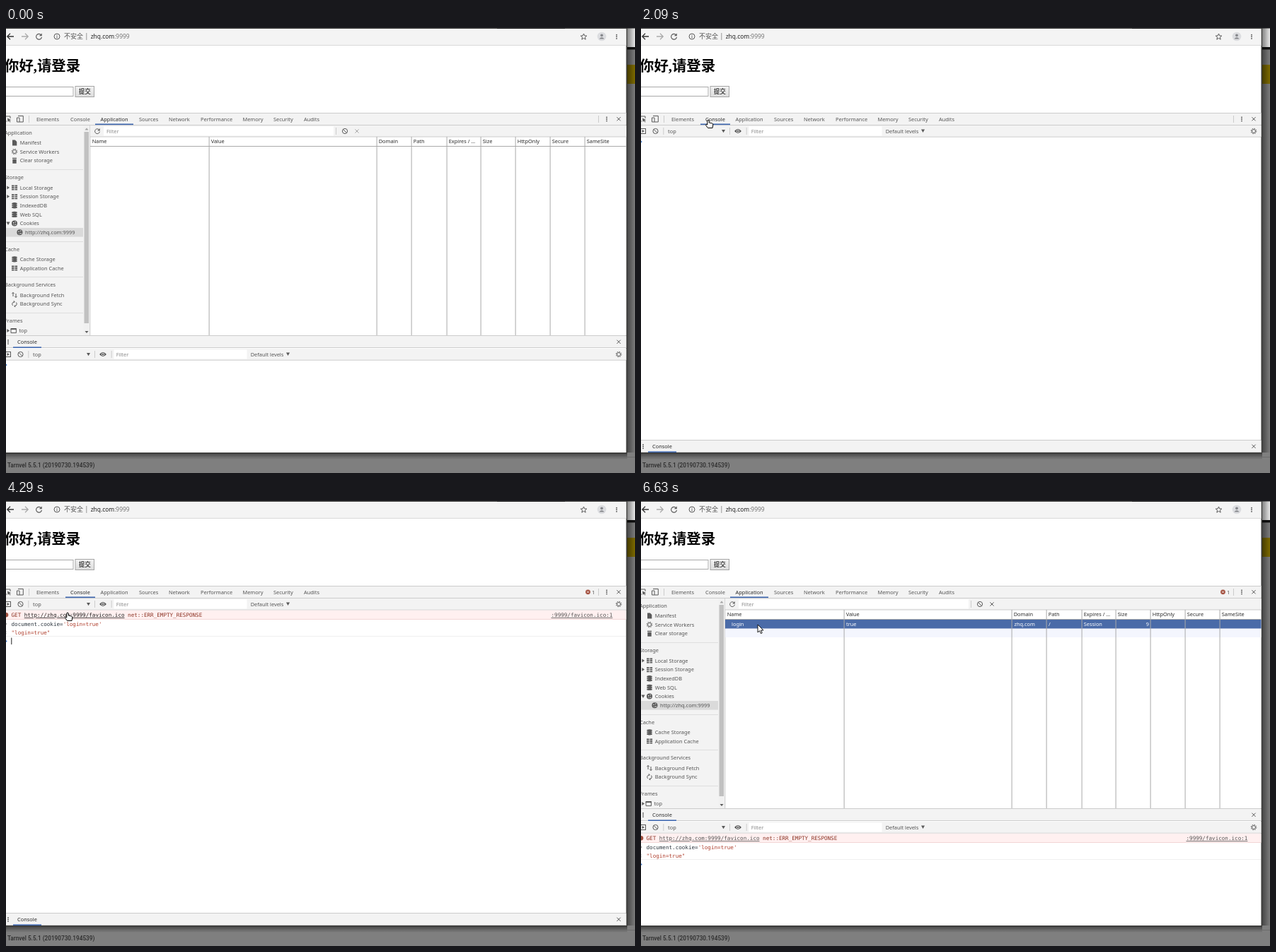
These frames come from a looping animation (889x630 px, 9.75 s). An HTML page:

```html
<!DOCTYPE html>
<html lang="zh-CN">
<head>
<meta charset="utf-8">
<title>Cookie login</title>
<style>
html, body { margin: 0; width: 100%; height: 100%; overflow: hidden; background: #7f7f7f; }
svg { display: block; width: 889px; height: 630px; }
text { font: 7.4px "Noto Sans", "Noto Sans CJK SC", sans-serif; fill: #555; white-space: pre; }
.dark { fill: #2b2b2b; }
.hint { fill: #8a8a8a; }
.mono { font: 7.6px "DejaVu Sans Mono", monospace; fill: #303942; }
.red { fill: #8c3324; }
.str { fill: #b0402f; }
.link { fill: #545454; text-decoration: underline; }
.url { font-size: 8.4px; fill: #222; }
.cjk { font-size: 9px; }
.title { font: bold 20.4px "Liberation Serif", "Noto Sans CJK SC", serif; fill: #000; }
.foot { font: 500 8.25px Roboto, sans-serif; fill: #2c2c2c; }
.ic { fill: #5a5a5a; }
.ln { fill: none; stroke: #5a5a5a; stroke-width: 1; }
.cur { fill: #fff; stroke: #000; stroke-width: 1; stroke-linejoin: round; }
</style>
</head>
<body>
<svg id="stage" viewBox="0 0 889 630"></svg>
<script>
const LOOP = 9750;
const stage = document.getElementById('stage');

const rect = (x, y, w, h, fill, more = '') =>
  `<rect x="${x}" y="${y}" width="${w}" height="${h}" fill="${fill}" ${more}/>`;
const hline = (y, fill = '#ccc', w = 876) => rect(0, y, w, 1, fill);
const vline = (x, y, h, fill = '#ccc') => rect(x, y, 1, h, fill);
const text = (x, y, s, cls = '', more = '') => `<text x="${x}" y="${y}" class="${cls}" ${more}>${s}</text>`;
const path = (d, cls = 'ic', more = '') => `<path d="${d}" class="${cls}" ${more}/>`;
const at = (x, y, body) => `<g transform="translate(${x} ${y})">${body}</g>`;
const group = (id, body) => `<g id="${id}">${body}</g>`;

const rows = f => [-3.4, -0.8, 1.8].map(f).join('');
const icon = {
  file: path('M-3-4H.8L3.3-1.5V4H-3Z'),
  gear: '<circle r="2.5" class="ln" stroke-width="1.7"/><circle r="3.8" class="ln" stroke-dasharray="1.5 1.48"/>',
  trash: path('M-3-4H3V-2.8H-3ZM-2.7-2H2.7V4H-2.7Z'),
  grid: path(rows(y => `M-4 ${y}h3.6v1.8h-3.6zM.5 ${y}h3.6v1.8h-3.6z`)),
  db: path(rows(y => `M-3.7 ${y}q3.7-1.6 7.4 0v1.6q-3.7 1.4-7.4 0z`)),
  cookie: '<circle r="4" class="ic"/>' + path('M-2-1.5h1.3v1.3h-1.3zM.7-2.5h1.2v1.2h-1.2zM.8.8h1.4v1.4h-1.4zM-1.4 1.5h1v1h-1z', '', 'fill="#f3f3f3"'),
  fetch: path('M-2 2V-3.4M-3.6-1.8L-2-3.6-.4-1.8M2-2V3.4M.4 1.8L2 3.6 3.6 1.8', 'ln'),
  sync: path('M-2.4 2.2A3.2 3.2 0 0 1-.4-3.1M2.4-2.2A3.2 3.2 0 0 1 .4 3.1M-1.2-4.4L.4-3.1-1.2-1.8M1.2 4.4L-.4 3.1 1.2 1.8', 'ln'),
  frame: path('M-3.7-3H3.7V3H-3.7Z', 'ln') + rect(-4, -3.4, 8, 1.8, '#5a5a5a'),
  ban: '<circle r="3.6" class="ln"/>' + path('M-2.5-2.5L2.5 2.5', 'ln'),
  close: path('M-2.6-2.6L2.6 2.6M2.6-2.6L-2.6 2.6', 'ln'),
  dots: rows(y => `<circle cy="${y + 0.8}" r=".95" class="ic"/>`),
  reload: path('M2.6-2A3.4 3.4 0 1 0 3.4.7', 'ln') + path('M3.7-4V-.6H.3Z'),
  eye: path('M-5 0Q0-6 5 0Q0 6-5 0Z') + '<circle r="2.1" fill="#f3f3f3"/><circle r="1.2" class="ic"/>',
  down: path('M-2.5-2H2.5L0 2.3Z'),
  right: path('M-1.6-2.5L2 0-1.6 2.5Z')
};
const put = (name, x, y) => at(x, y, icon[name]);

function backdrop() {
  return rect(0, 0, 889, 630, '#7f7f7f') +
    rect(878, 1, 11, 26, '#ececec') + rect(878, 27, 11, 3.5, '#111') +
    rect(878, 52, 11, 27, '#7f6c00') + rect(878, 0, 11, 601, 'url(#sideShade)') +
    rect(0, 602, 878, 9, 'url(#footShade)') + hline(607, '#6c6c6c', 889) +
    text(2, 622.3, 'Tarnvel 5.5.1 (20190730.194539)', 'foot') +
    rect(0, 0, 878, 602.5, '#3a3a38') + rect(0, 1, 876.5, 600, '#fff');
}

function browser() {
  return rect(694, 0, 96, 1, '#161616') + rect(0, 1, 876.5, 23.5, '#f4f4f4') + hline(24, '#dadada', 876.5) +
    at(6, 12, path('M5 0H-4M0-4.2L-4.2 0 0 4.2', 'ln', 'style="stroke:#333;stroke-width:1.3"')) +
    at(27, 12, path('M-5 0H4M0-4.2L4.2 0 0 4.2', 'ln', 'style="stroke:#aaa;stroke-width:1.3"')) +
    at(46.5, 12, `<g transform="scale(1.15)">${icon.reload}</g>`) +
    at(72, 12, '<circle r="4" class="ln"/>' + path('M-.5-2.2H.5V-1.2H-.5ZM-.5-.4H.5V2.3H-.5Z')) +
    text(82, 15.4, '不安全', 'cjk') + vline(113.3, 7, 10, '#999') +
    text(119.7, 15, 'zhq.com<tspan fill="#777">:9999</tspan>', 'url') +
    at(816.5, 12.3, path('M0-4.3L1.2-1.4 4.3-1.2 1.9.8 2.7 3.9 0 2.2-2.7 3.9-1.9.8-4.3-1.2-1.2-1.4Z', 'ln')) +
    at(842, 12, '<circle r="6.3" fill="#dcdde0"/><circle cy="-1.7" r="1.9" fill="#85878b"/>' + path('M-3.6 3.6Q0-1 3.6 3.6Z', '', 'fill="#85878b"')) +
    put('dots', 863, 12.3) +
    text(-2, 61.2, '你好,请登录', 'title') +
    rect(-5, 83.5, 100, 13, '#fff', 'stroke="#a9a9a9"') +
    rect(98, 82.5, 26.5, 15, 'url(#button)', 'stroke="#a6a6a6"') +
    text(102.7, 93.2, '提交', '', 'style="font-size:8.6px;fill:#000"');
}

const tabs = { Elements: 43, Console: 91, Application: 133.6, Sources: 188, Network: 230, Performance: 275, Memory: 334.5, Security: 378, Audits: 421 };

function tabBar() {
  return rect(0, 120, 876.5, 17, '#f3f3f3') + hline(120) + hline(137) +
    group('hover', rect(126, 121, 54, 16, '#e8e8e8')) +
    path('M-1 125H6V128M-1 132H1', 'ln') + path('M2 127.5L7.2 130.2 5 130.9 6.6 133 5.6 133.6 4.2 131.6 2.6 133Z') +
    path('M17 124.5H24.3V133H19', 'ln') + path('M15.5 127H19V133H15.5Z', 'ln') +
    vline(32, 124, 10) + vline(837, 124, 10) +
    Object.entries(tabs).map(([s, x]) => text(x, 131.7, s, '', `id="tab${s}"`)).join('') +
    rect(0, 135.5, 1, 1.6, '#3f68b0', 'id="mark"') +
    group('badge', at(822.5, 128.8, '<circle r="3.4" fill="#a3503f"/>' + path('M-1.4-1.4L1.4 1.4M1.4-1.4L-1.4 1.4', 'ln', 'style="stroke:#fff;stroke-width:.8"')) + text(828, 131.6, '1')) +
    put('dots', 849, 129) + put('close', 866, 128.8);
}

// [label, centre y, icon, indent, twisty]
const tree = [
  ['Application', 148], ['Manifest', 162.4, 'file'], ['Service Workers', 175, 'gear'], ['Clear storage', 187.7, 'trash'],
  ['Storage', 211.4], ['Local Storage', 226, 'grid', 0, 'right'], ['Session Storage', 238.6, 'grid', 0, 'right'],
  ['IndexedDB', 251.3, 'db'], ['Web SQL', 264, 'db'], ['Cookies', 276.6, 'cookie', 0, 'down'], ['http://zhq.com:9999', 289.2, 'cookie', 7.4],
  ['Cache', 313], ['Cache Storage', 327.4, 'db'], ['Application Cache', 340, 'grid'],
  ['Background Services', 363.5], ['Background Fetch', 378, 'fetch'], ['Background Sync', 390.7, 'sync'],
  ['Frames', 414], ['top', 428.6, 'frame', -1.3, 'right']
];
const columns = { Name: 119, Value: 287, Domain: 524, Path: 573, 'Expires / …': 623, Size: 671, HttpOnly: 720, Secure: 769, SameSite: 818 };

function sidebar() {
  return rect(0, 138, 119, 297, '#f3f3f3') + rect(0, 283, 109, 12.6, '#dadada') +
    [200, 302, 352, 403].map(y => hline(y, '#dedede', 109)).join('') +
    tree.map(([s, y, pic, dx = 0, twisty]) =>
      (pic ? put(pic, 12 + dx, y) : '') + (twisty ? put(twisty, 3, y) : '') +
      text(pic ? 19.7 + dx : -2, y + 2.7, s)).join('') +
    rect(109.5, 138, 9, 297, '#f1f1f1') + rect(110.5, 147, 6.5, 271, '#c1c1c1') +
    path('M111.5 144.5H116.5L114 141.5Z', '', 'fill="#a3a3a3"') + path('M111.5 429H116.5L114 432Z') +
    vline(118.3, 138, 297);
}

function cookieRow() {
  const cells = [['login', 128], ['true', 290], ['zhq.com', 527.5], ['/', 576], ['Session', 625.7], ['9', 713.7]];
  return rect(119, 180.5, 757.5, 12.5, '#f4f6fe') + rect(119, 168, 757.5, 12.5, 'none', 'id="pick"') +
    group('cells', cells.map(([s, x]) => text(x, 176.7, s, '', 'style="fill:inherit"')).join(''));
}

function appPane() {
  return rect(0, 138, 876.5, 297, '#fff') + sidebar() +
    rect(119, 138, 757.5, 16, '#f3f3f3') + rect(138, 139.5, 325, 13, '#fff') + put('reload', 129, 146) +
    text(142, 148.7, 'Filter', 'hint') + vline(466, 141, 10) + put('ban', 479, 146) +
    group('clear', put('close', 496, 146)) +
    rect(119, 153.5, 757.5, 1, '#ccc') + rect(119, 167, 757.5, 1, '#aaa') +
    group('row', cookieRow()) +
    Object.entries(columns).map(([s, x], i) => (i ? vline(x - 0.4, 154, 281, '#aaa') : '') + text(x + 2.7, 163.4, s, 'dark')).join('');
}

function drawerHead() {
  return rect(0, 436, 876.5, 17, '#f3f3f3') + hline(435) + hline(452) + put('dots', 3, 444.5) +
    text(16, 447.4, 'Console', 'dark') + rect(10, 451.4, 40, 1.6, '#3f68b0') + put('close', 866, 444.3);
}

const chevron = (y, color) => path(`M-1.5 ${y - 2}L.8 ${y} -1.5 ${y + 2}`, 'ln', `style="stroke:${color};stroke-width:1.2"`);

function consolePane() {
  return rect(0, 138, 876.5, 16, '#f3f3f3') + hline(153.7) +
    rect(-1, 142.5, 7.5, 7, 'none', 'class="ln"') + path('M1.5 144L5 146 1.5 148Z') +
    put('ban', 20.5, 146) + vline(31.3, 141, 10) + text(38, 148.7, 'top') + put('down', 116.5, 146) +
    vline(125, 141, 10) + put('eye', 137, 146) + vline(148.7, 141, 10) +
    rect(152.5, 139.5, 188, 13, '#fff') + text(155.7, 148.7, 'Filter', 'hint') +
    text(345.7, 148.7, 'Default levels') + put('down', 398.5, 145.6) + put('gear', 866, 146) +
    group('error', rect(0, 154.7, 876.5, 13, '#fff0f0') + hline(167, '#f3d6d6') +
      '<circle cx="0" cy="161.2" r="3.3" fill="#a3503f"/>' +
      text(7.5, 164, 'GET <tspan class="link" id="link">http://zhq.com:9999/favicon.ico</tspan> net::ERR_EMPTY_RESPONSE', 'mono red') +
      text(770.5, 164, ':9999/favicon.ico:1', 'mono link')) +
    group('command', text(7.5, 176.7, 'document.cookie=<tspan class="str">\'login=true\'</tspan>', 'mono')) +
    group('answer', chevron(174, '#aaa') + path('M1-1.8L-1.2 0 1 1.8', 'ln', 'transform="translate(0 186.4)" style="stroke:#bbb"') +
      text(7.5, 189, '"login=true"', 'mono str') + hline(191, '#f0f0f0', 876)) +
    group('prompt', chevron(0, '#3a78d0')) + rect(0, 0, 1, 9.5, '#222', 'id="caret"');
}

const tip = (id, x, w, s) => group(id,
  rect(x + 1, 156, w, 16, '#000', 'rx="2" opacity=".15"') +
  rect(x, 155.5, w, 15.5, '#f3f3f3', 'rx="2" stroke="#bdbdbd"') + text(x + 5, 165.8, s, 'dark'));

const cursors = {
  arrow: path('M0 0V11L2.6 8.7 4.4 12.6 6.2 11.8 4.5 8H8Z', 'cur', 'style="fill:#fff;stroke-width:.9"'),
  hand: path('M-1.2.8Q0-.8 1.2.8V4L5.6 5Q7 5.5 6.8 7L6 11.5H-.5L-3.6 7.3Q-3.6 5.6-1.2 7Z', 'cur'),
  ibeam: path('M-2.5-6Q0-6 0-4.8Q0-6 2.5-6M0-5V5M-2.5 6Q0 6 0 4.8Q0 6 2.5 6', 'ln', 'style="stroke:#111;stroke-width:1.3"'),
  resize: path('M0-7L4-2.7H1.3V2.7H4L0 7-4 2.7H-1.3V-2.7H-4Z', 'cur')
};

stage.innerHTML = `<defs>
  <linearGradient id="sideShade"><stop stop-opacity=".45"/><stop offset="1" stop-opacity=".02"/></linearGradient>
  <linearGradient id="footShade" x2="0" y2="1"><stop stop-opacity=".45"/><stop offset="1" stop-opacity="0"/></linearGradient>
  <linearGradient id="button" x2="0" y2="1"><stop stop-color="#f3f3f3"/><stop offset="1" stop-color="#dcdcdc"/></linearGradient>
  </defs>` + backdrop() + browser() + group('console', consolePane()) + group('app', appPane()) +
  group('drawer', drawerHead()) + tabBar() +
  tip('tipContext', 35, 78, 'JavaScript context') + tip('tipLive', 129, 86, 'Create live expression') +
  Object.entries(cursors).map(([k, body]) => group(k, body)).join('');

const ui = {};
stage.querySelectorAll('[id]').forEach(e => ui[e.id] = e);
const show = (id, on) => ui[id].style.display = on ? '' : 'none';
const move = (id, x, y) => ui[id].setAttribute('transform', `translate(${x} ${y})`);
const set = (id, attrs) => Object.entries(attrs).forEach(([k, v]) => ui[id].setAttribute(k, v));

// Pointer stops: [time, shape, x, y]
const route = [
  [0, '', 864, 58], [860, 'arrow', 864, 58], [1140, '', 75, -14], [1340, 'arrow', 212, 0],
  [1500, 'arrow', 165, 70], [1660, 'resize', 128, 120], [1700, 'resize', 125, 123], [1740, 'hand', 117, 127],
  [1900, 'hand', 95, 130], [2130, 'hand', 95, 130], [2210, 'arrow', 97, 142], [2290, 'ibeam', 97, 159],
  [2790, 'ibeam', 97, 159], [2830, 'ibeam', 88, 163], [3000, 'hand', 87, 158], [4990, 'hand', 87, 158],
  [5030, 'hand', 92, 157], [5070, 'arrow', 105, 151], [5190, 'arrow', 136, 145], [5290, 'arrow', 137, 142],
  [5330, 'hand', 139, 134], [5450, 'hand', 154, 125], [5750, 'hand', 154, 125], [5790, 'hand', 154, 128],
  [5830, 'arrow', 157, 140], [6110, 'arrow', 166, 176], [6340, 'arrow', 166, 175], [6380, 'arrow', 165, 175]
];

function pointer(t) {
  const i = route.findLastIndex(k => t >= k[0]);
  const [t0, shape, x, y] = route[i];
  const [t1, , x1, y1] = route[i + 1] || route[i];
  const p = t1 > t0 ? Math.floor((t - t0) / 40) * 40 / (t1 - t0) : 0;
  Object.keys(cursors).forEach(k => show(k, k === shape));
  if (shape) move(shape, Math.round(x + (x1 - x) * p), Math.round(y + (y1 - y) * p));
}

function render(t) {
  const between = (a, b) => t >= a && t < b;
  const inConsole = between(2090, 5700);
  show('app', !inConsole);
  move('console', 0, inConsole ? 0 : 316);
  move('drawer', 0, inConsole ? 148 : 0);
  set('mark', inConsole ? { x: 84, width: 42 } : { x: 126, width: 54 });
  ui.tabConsole.classList.toggle('dark', inConsole);
  ui.tabApplication.classList.toggle('dark', !inConsole || t >= 5330);
  show('hover', between(5330, 5700));

  show('badge', t >= 2830);
  show('error', t >= 3000);
  show('command', t >= 3420);
  show('answer', t >= 4240);
  ui.link.style.fill = between(3000, 5030) ? '#222' : '';

  const line = t < 3000 ? 161 : t < 4240 ? 174 : 198.6;
  move('prompt', 0, line);
  set('caret', { x: between(3420, 4240) ? 136 : 7.3, y: line - 5 });
  const start = t < 3420 ? 2100 : t < 4240 ? 3420 : 4220;
  show('caret', inConsole && t >= start && Math.floor((t - start) / 525) % 2 === 0);

  show('row', t >= 5700);
  const picked = t >= 6630;
  set('pick', { fill: picked ? '#4a6ba8' : 'none' });
  set('cells', { fill: picked ? '#fff' : '#303030' });
  set('clear', { opacity: picked ? 1 : 0.5 });

  set('tipContext', { opacity: between(2250, 2340) ? 1 : between(2340, 2380) ? 0.5 : between(2380, 2510) ? 0.07 : 0 });
  set('tipLive', { opacity: between(5290, 5410) ? 1 : between(5410, 5450) ? 0.5 : 0 });
  pointer(t);
}

const begin = performance.now();
function tick() {
  render((performance.now() - begin) % LOOP);
  requestAnimationFrame(tick);
}
tick();
</script>
</body>
</html>
```
